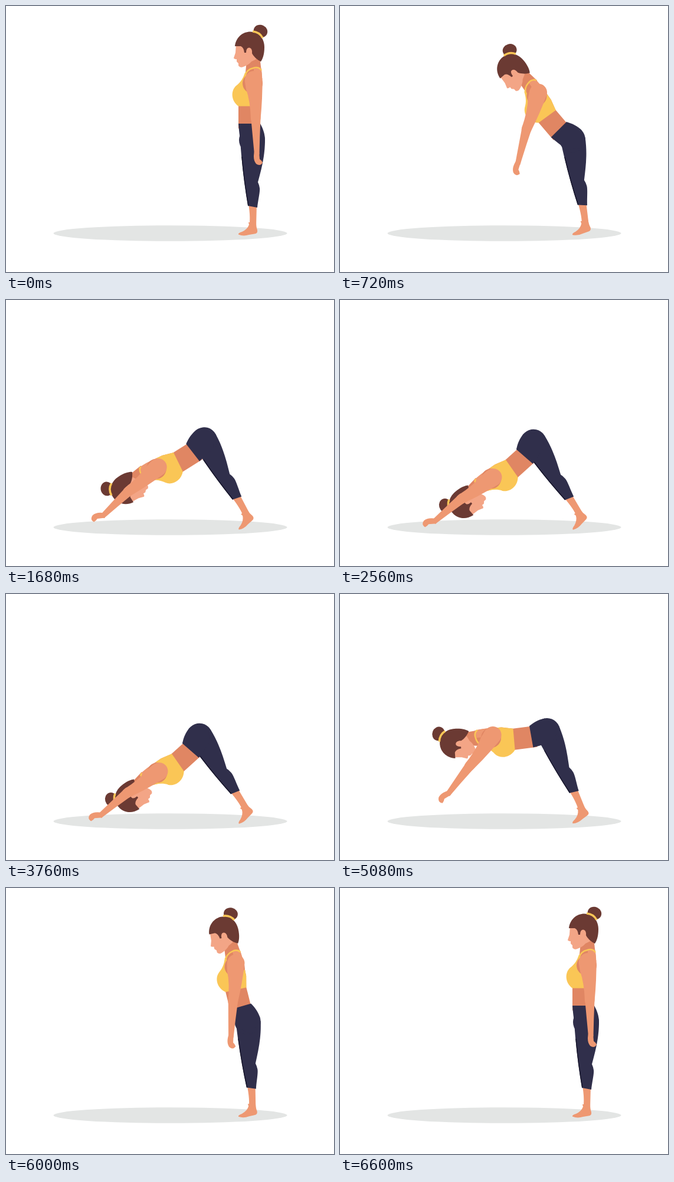
An HTML page for the animation above (7.2 s loop, 556 by 450 pixels).

```html
<!DOCTYPE html>
<html lang="en">
<head>
<meta charset="utf-8">
<title>Yoga stretch</title>
<style>
  html, body { margin: 0; width: 100%; height: 100%; overflow: hidden; background: #fff; }
  svg { display: block; width: 556px; height: 450px; }
  .skin { fill: #ee9872; }
  .face { fill: #f3a586; }
  .shade { fill: #e08663; }
  .hair { fill: #6b3a33; }
  .top { fill: #fac656; }
  .pants { fill: #302f4b; }
  .strap { fill: none; stroke: #fac656; }
</style>
</head>
<body>
<!-- Every part is drawn where it sits in the standing pose. -->
<svg viewBox="0 0 556 450">
  <ellipse cx="278.5" cy="384.5" rx="198" ry="13.3" fill="#e3e5e4"/>
  <g id="foot">
    <path class="skin" d="M411 366 L424 366 Q424 374 426 379 Q427 385 421 385.500 L412 387 Q402 390 394 386.500 Q393 384 400 382 Q409 378 412 370Z"/>
  </g>
  <g id="head">
    <path class="shade" d="M408 92 L430 84 L433 112 L406 112Z"/>
    <path class="face" d="M390 64 L389 79 L386 88 Q387 90 391 90 L391 94 L394 97 L394 101 Q397 105 402 103 Q411 100 416 94 L424 90 L422 66Z"/>
    <ellipse class="hair" cx="431.500" cy="42.500" rx="12" ry="10.500" transform="rotate(25 431.5 42.5)"/>
    <path class="hair" d="M388 68 C390 52 402 43.500 414 43.500 C430 44 438 56 438 70 C438 82 435 90 432 94 C426 91 420 86 417 80 C418 73 414 69 410 71 Q407 73 407 79 L404 79 Q403 70 398 68Z"/>
    <path class="strap" stroke-width="3.500" d="M418 43 Q430 44 435 54"/>
  </g>
  <g id="belly">
    <path class="shade" d="M394 160 L430 160 L430 207 L394 207Z"/>
  </g>
  <g id="leg">
    <path class="skin" d="M411 334 L425 334 L424 374 L412 373 Q415 360 411 334Z"/>
    <path class="pants" d="M397 226 C399 262 404 300 410 338 L426 341 C427 330 431 314 430 308 Q429 302 427 298 C433 276 439 254 439 227Z"/>
    <circle class="pants" cx="417" cy="227" r="22"/>
    <path fill="none" stroke="#17162c" stroke-width="1.500" d="M400 255 Q404 300 411 338"/>
  </g>
  <g id="pelvis">
    <path class="pants" d="M394 199 L431 199 C436 208 439 217 439 227 L417 249 L398 232Q395 214 394 199Z"/>
  </g>
  <g id="chest">
    <path class="shade" d="M394 169 L392 138 Q406 124 408 106 L432 104 L434 120 L434 150 L430 169Z"/>
    <path class="skin" d="M420 106 L432 104 Q435 112 434 142 L420 142Z"/>
    <path class="top" d="M394 169.500 C381 160 381 143 390 135 C398 129 402 122 405 113 L408 111 Q404 140 418 146 L434 139 L434 150 L430 169.500Z"/>
    <path class="strap" stroke-width="2.500" d="M404 120 Q408 107 419 105 Q428 102 433 109"/>
    <circle class="shade" cx="418" cy="131" r="17"/>
  </g>
  <g id="hand">
    <path class="skin" d="M421 246 C419 256 420 262 424 267 Q431 272 435 265 Q433 261 430 259 L429 246Z"/>
  </g>
  <g id="forearm">
    <path class="skin" d="M415 187 Q418 220 421 251 L429.500 251 Q430 222 431.500 190 A8 8 0 0 0 415 187Z"/>
  </g>
  <g id="arm">
    <path class="skin" d="M405 129 A15 16 0 0 1 434.500 123 Q435 155 431.500 191 A8 8 0 0 1 415 191 Q414 160 407 141Z"/>
  </g>
</svg>
<script>
const LOOP = 7200, STEP = 40;

// time, head angle
const timing = [
  [0, 0], [40, 0], [720, 41], [800, 50], [1280, 94], [1680, 123], [2060, 131],
  [4440, 131], [5080, 94], [5600, 50], [6080, 9], [6440, 0], [7200, 0]
];

// head, leg, pelvis, chest, arm, forearm, hand (degrees, counterclockwise)
const poses = [
  [0, 0, 0, 0, 0, 0, 0],
  [41, 8.2, 45, 36, -21, -16, -22],
  [50, 10.3, 48, 41, -23, -20, -32],
  [94, 23.5, 100, 95, -40, -39.5, -63],
  [123, 29.1, 128, 116, -54, -48, -87],
  [128, 31, 134, 121, -65, -58, -90],
  [131, 32.2, 139, 125, -59, -52, -90]
];

// Monotone cubic interpolation of column c over column 0.
function curve(rows, x, c) {
  const slope = i => (rows[i + 1][c] - rows[i][c]) / (rows[i + 1][0] - rows[i][0]);
  const last = rows.length - 1;
  const tangent = i => {
    if (i === 0) return slope(0);
    if (i === last) return slope(last - 1);
    const a = slope(i - 1), b = slope(i);
    return a * b > 0 ? 2 * a * b / (a + b) : 0;
  };
  let i = 0;
  while (i < last - 1 && x > rows[i + 1][0]) i++;
  const h = rows[i + 1][0] - rows[i][0], u = (x - rows[i][0]) / h, v = 1 - u;
  return rows[i][c] * v * v * (1 + 2 * u) + rows[i + 1][c] * u * u * (3 - 2 * u)
    + h * u * v * (tangent(i) * v - tangent(i + 1) * u);
}

// Turns a part about its joint, which rides on the parent; returns its point mapping.
function place(id, parent, px, py, degrees) {
  const [x, y] = parent(px, py);
  const a = degrees * Math.PI / 180, cos = Math.cos(a), sin = Math.sin(a);
  document.getElementById(id).setAttribute('transform',
    `translate(${x} ${y}) rotate(${-degrees}) translate(${-px} ${-py})`);
  return (qx, qy) => [
    x + (qx - px) * cos + (qy - py) * sin,
    y - (qx - px) * sin + (qy - py) * cos
  ];
}

function draw(t) {
  const bend = curve(timing, t, 1);
  const [legA, pelvisA, chestA, armA, forearmA, handA] =
    [1, 2, 3, 4, 5, 6].map(c => curve(poses, bend, c));
  const swing = t > 40 && t < 500 ? 14 * Math.sin(Math.PI * (t - 40) / 460) : 0;

  const ground = (x, y) => [x, y];
  const foot = place('foot', ground, 398, 386, legA * 1.12);
  const leg = place('leg', foot, 417, 372, legA);
  const pelvis = place('pelvis', leg, 417, 227, pelvisA);
  const belly = place('belly', pelvis, 413, 199, (pelvisA + chestA) / 2);
  const chest = place('chest', belly, 412, 169, chestA);
  place('head', chest, 416, 100, bend);
  const arm = place('arm', chest, 419, 130, armA + swing);
  const forearm = place('forearm', arm, 423, 191, forearmA + swing);
  place('hand', forearm, 425, 249, handA + swing);
}

function tick() {
  draw(Math.floor(performance.now() % LOOP / STEP) * STEP);
  requestAnimationFrame(tick);
}
tick();
</script>
</body>
</html>
```
